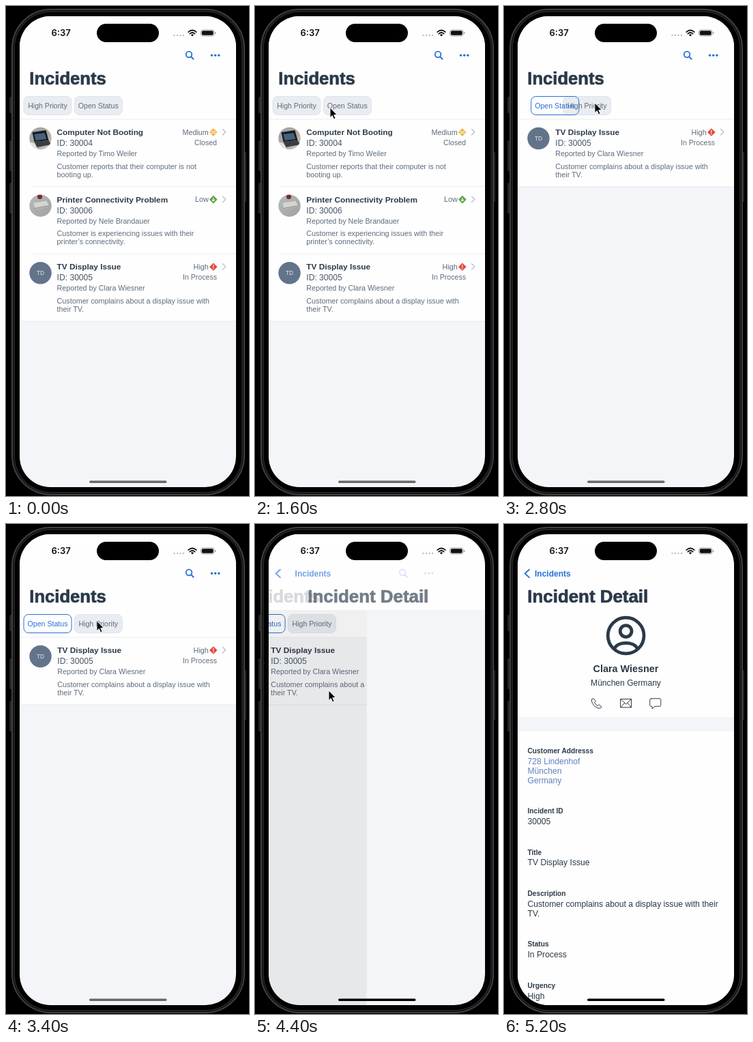
Animation of 356x718 px, one loop 5400 ms. Source, as an HTML page:

```html
<!DOCTYPE html>
<html lang="en">
<head>
<meta charset="utf-8">
<title>Incidents</title>
<style>
  html, body { margin: 0; height: 100%; overflow: hidden; background: #000; }
  svg { display: block; width: 100vw; height: 100vh; }
  text { font-family: "Liberation Sans", Arial, sans-serif; white-space: pre; }
</style>
</head>
<body>
<svg viewBox="0 0 356 718">
  <defs>
    <clipPath id="screen"><rect x="20" y="15" width="317" height="690" rx="45"/></clipPath>
    <clipPath id="disc"><circle r="16.2"/></clipPath>
    <linearGradient id="desk" x1="0" y1="0" x2="1" y2="1">
      <stop stop-color="#9aa3aa"/><stop offset=".6" stop-color="#b5a99e"/><stop offset="1" stop-color="#d9d5d0"/>
    </linearGradient>
    <linearGradient id="paper" x1="0" y1="0" x2="1" y2="1">
      <stop stop-color="#b9babb"/><stop offset="1" stop-color="#9fa0a0"/>
    </linearGradient>
  </defs>
  <g fill="#242426">
    <rect x="5" y="133" width="6" height="24" rx="1.5"/>
    <rect x="5" y="197" width="6" height="45" rx="1.5"/>
    <rect x="5" y="259" width="6" height="45" rx="1.5"/>
    <rect x="346" y="214" width="6" height="73" rx="1.5"/>
  </g>
  <rect x="9" y="5" width="340" height="711" rx="57" fill="#09090a" stroke="#414144" stroke-width="2"/>
  <rect x="12" y="8" width="334" height="705" rx="54" fill="#000" stroke="#232325" stroke-width="2"/>
  <g clip-path="url(#screen)">
    <g id="pages"></g>
    <g id="status"></g>
  </g>
</svg>
<script>
const LOOP = 5400, STEP = 200;
const INK = '#2b3a49', MUTED = '#5d6c7c', BLUE = '#2a70d8', PAGE = '#fefefe', GREY = '#f4f5f8';

const ROWS = {
  laptop: { title: 'Computer Not Booting', id: 30004, by: 'Timo Weiler', level: 'Medium', state: 'Closed',
    note: ['Customer reports that their computer is not', 'booting up.'] },
  printer: { title: 'Printer Connectivity Problem', id: 30006, by: 'Nele Brandauer', level: 'Low', state: '',
    note: ['Customer is experiencing issues with their', 'printer\u2019s connectivity.'] },
  tv: { title: 'TV Display Issue', id: 30005, by: 'Clara Wiesner', level: 'High', state: 'In Process',
    note: ['Customer complains about a display issue with', 'their TV.'] }
};

const AVATARS = {
  laptop: `<g clip-path="url(#disc)"><rect x="-17" y="-17" width="34" height="34" fill="url(#desk)"/>
    <path d="M-12-9 8-12 12 3-9 5Z" fill="#171c24"/><path d="M-9-6 6-8 9 1-7 3Z" fill="#46617b"/>
    <path d="M-9 5 12 3 16 9-5 13Z" fill="#3a3d42"/><path d="M-17 5-9 7-3 17-17 17Z" fill="#e4e2df"/></g>`,
  printer: `<g clip-path="url(#disc)"><rect x="-17" y="-17" width="34" height="34" fill="url(#paper)"/>
    <path d="M-10-4 9-7 13 1-8 5Z" fill="#d4d4d3"/><path d="M-9 4 13 0" stroke="#858585"/>
    <circle cx="-1" cy="-13" r="3.5" fill="#7a2a2a"/></g>`,
  tv: `<circle r="16.2" fill="#63748a"/><text y="3" font-size="8.4" text-anchor="middle" fill="#dfe5ec">TD</text>`
};

const MARKS = {
  Medium: ['#efb23f', 'M-3-1H3M-3 1.2H3'],
  Low: ['#55a03e', 'M0-2.6V2M-1.8.4 0 2.2 1.8.4'],
  High: ['#e2483d', 'M0-3V.6M0 2V3']
};

// Pointer positions: time, x, y
const POINTER = [[800, 36, 142], [1000, 39, 142], [1400, 62, 145], [1600, 110, 149], [2000, 118, 147],
  [2200, 127, 145], [2600, 133, 142], [3600, 134, 149], [3800, 134, 205], [4000, 132, 236],
  [4400, 108, 244], [4600, 35, 266]];

const mix = (a, b, p) => a + (b - a) * p;
const easeOut = (t, start, length, power) =>
  1 - (1 - Math.min(1, Math.max(0, (t - start) / length))) ** power;

const text = (x, y, size, str, fill = INK, extra = '') =>
  `<text x="${x}" y="${y}" font-size="${size}" fill="${fill}" ${extra}>${str}</text>`;
const bold = (x, y, size, str, fill = INK, extra = '') => text(x, y, size, str, fill, 'font-weight="700" ' + extra);
const rect = (x, y, w, h, fill, extra = '') =>
  `<rect x="${x}" y="${y}" width="${w}" height="${h}" fill="${fill}" ${extra}/>`;
const line = (d, color, width = 1) =>
  `<path d="${d}" fill="none" stroke="${color}" stroke-width="${width}" stroke-linecap="round" stroke-linejoin="round"/>`;
const group = (x, y, body, opacity = 1) =>
  `<g transform="translate(${x} ${y})" opacity="${opacity}">${body}</g>`;
const headline = (x, size, str) => bold(x, 114.6, size, str, INK, `stroke="${INK}" stroke-width=".7"`);

function row(kind, y, nudge) {
  const r = ROWS[kind], [color, mark] = MARKS[r.level], x = 74.6 + nudge;
  const right = 'text-anchor="end"';
  return group(0, y,
    group(50.5, 28, AVATARS[kind]) +
    bold(x, 23, 11.8, r.title) +
    text(x, 39.3, 12.1, 'ID: ' + r.id, '#48586a') +
    text(x, 54.3, 10.7, 'Reported by ' + r.by, MUTED) +
    r.note.map((s, i) => text(x, 72.5 + i * 12.2, 10.75, s, MUTED)).join('') +
    text(296.8, 22.8, 10.8, r.level, MUTED, right) +
    text(309, 38, 10.6, r.state, MUTED, right) +
    group(303.8, 19, `<path d="M0-5.8 5.8 0 0 5.8-5.8 0Z" fill="${color}"/>` + line(mark, '#fff', 1.1)) +
    line('M317.5 14.5 321.8 18.7 317.5 23', '#b4bac1', 1.2));
}

function chip(x, label, on) {
  return rect(x + .5, 132.5, 70, 27, on ? 'none' : '#e9ecf0',
      `rx="7" stroke="${on ? BLUE : '#dfe3e9'}"`) +
    text(x + 35.5, 149.8, 10.6, label, on ? BLUE : MUTED, 'text-anchor="middle"');
}

function listPage(t) {
  const filtered = t >= 2600, nudge = t >= 1600 ? .7 : 0;
  const swap = easeOut(t, 2580, 510, 3);
  const kinds = filtered ? ['tv'] : ['laptop', 'printer', 'tv'];
  const end = filtered ? 265 : 462;
  let out = rect(20, 15, 317, 690, GREY) + rect(20, 15, 317, end - 15, PAGE);
  if (t >= 4200) out += rect(20, 166, 317, 99, GREY);
  out += line('M20 166H337', '#e6e8eb', .8) + line(`M20 ${end}H337`, '#e0e3e7', .8);
  kinds.forEach((kind, i) => {
    const y = 166 + i * 98.6;
    if (i) out += line(`M36 ${y}H337`, '#e8eaed', .8);
    out += row(kind, y, nudge);
  });
  return out + chip(mix(25.5, 99.8, swap), 'High Priority', false) +
    chip(mix(99.8, 25.5, swap), 'Open Status', filtered);
}

const listHeader = () => headline(34.3, 25.6, 'Incidents') +
  `<circle cx="268" cy="71" r="4.3" fill="none" stroke="${BLUE}" stroke-width="1.8"/>` +
  line('M271.4 74.5 274.6 77.8', BLUE, 2) +
  [301.5, 306.7, 311.9].map(x => `<circle cx="${x}" cy="72.3" r="1.7" fill="${BLUE}"/>`).join('');

const detailHeader = slide => line('M37 66.8 30.7 72.5 37 78.4', BLUE, 1.9) +
  bold(45 + 30 * slide, 76.7, 12, 'Incidents', BLUE) +
  headline(34.3 + 95 * slide, 25.9, 'Incident Detail');

function detailBody() {
  const mid = 'text-anchor="middle"', link = '#5c82c0';
  const fields = [[336, 'Customer Addresss', '728 Lindenhof', 'München', 'Germany'],
    [424, 'Incident ID', '30005'], [484.5, 'Title', 'TV Display Issue'],
    [544.7, 'Description', 'Customer complains about a display issue with their', 'TV.'],
    [619.3, 'Status', 'In Process'], [680, 'Urgency', 'High']];
  return rect(20, 126, 317, 579, PAGE) + rect(20, 283, 317, 21, GREY) +
    group(178.6, 163.5, `<g fill="none" stroke="${INK}" stroke-width="4.8"><circle r="26.4"/>
      <circle cy="-6.5" r="8.4"/><path d="M-17 19.5C-12 8 12 8 17 19.5"/></g>`) +
    bold(178.5, 216.6, 14.4, ROWS.tv.by, INK, mid) +
    text(178.5, 237, 12.1, 'München Germany', INK, mid) +
    line('M128.5 257.2 131 255.5 134.2 259.6 132.6 261.6Q134 264.8 137.2 266.4L139.4 264.8 143 268 141 270Q138.5 271 134 267.8 127.5 262.8 128.5 257.2Z', INK) +
    line('M171 256.5H186.5V268.8H171ZM171 256.7 178.8 264 186.5 256.7M171 268.6 176.6 262.4M186.5 268.6 181 262.4', INK) +
    line('M215.5 255.8H228Q229.8 255.8 229.8 257.6V265.4Q229.8 267.2 228 267.2H221L217 270.8V267.2H215.5Q213.7 267.2 213.7 265.4V257.6Q213.7 255.8 215.5 255.8Z', INK) +
    fields.map(([y, label, ...lines], n) => bold(34.5, y, 10.2, label) +
      lines.map((s, i) => text(34.5, y + 15.8 + i * 14, 12.15, s, n ? INK : link)).join('')).join('');
}

function pointer(t) {
  const at = POINTER.filter(p => p[0] <= t).pop();
  if (!at || t >= 4800) return '';
  return group(at[1], at[2], '<path d="M0 0V14.5L3.3 11.5 5.6 16.8 8 15.8 5.7 10.6H10.2Z" fill="#000" stroke="#fff" stroke-width=".9"/>');
}

const statusBar = () => text(66.5, 44, 13, '6:37', '#111', 'style="font-family:Inter,sans-serif;font-weight:600"') +
  rect(133, 26, 91, 27, '#000', 'rx="13.5"') +
  [246.5, 251, 255.5, 260].map(x => `<circle cx="${x}" cy="43" r="1.2" fill="#bbb"/>`).join('') +
  `<path d="M273 44.6 270.8 42.3Q273 40.4 275.2 42.3Z" fill="#111"/>` +
  line('M269.3 40.6Q273 37.4 276.7 40.6M267.2 38.2Q273 32.8 278.8 38.2', '#111', 1.7) +
  rect(285.5, 35, 19.5, 9, 'none', 'rx="3" stroke="#999" stroke-width=".9"') +
  rect(286.8, 36.3, 16.9, 6.4, '#111', 'rx="1.8"') + rect(306, 38, 1.2, 3.2, '#999', 'rx=".6"');

function draw(t) {
  const push = easeOut(t, 4300, 400, 2.75), rest = 1 - push;
  let out = '';
  if (push < 1) {
    out += group(-95 * push, 0, listPage(t));
    if (push) out += rect(20, 15, 317, 690, '#000', `opacity="${.1 * push}"`) +
      rect(20, 15, 317, 111, PAGE) + rect(20 + 317 * rest, 126, 317, 579, GREY);
    out += group(-95 * push, 0, listHeader(), Math.max(0, 1 - 1.5 * push));
  } else {
    out += rect(20, 15, 317, 690, PAGE) + detailBody();
  }
  if (push) out += group(0, 0, detailHeader(rest), Math.min(1, 1.2 * push));
  out += rect(122, 695.5, 113.5, 3.6, push ? '#050505' : '#68696b', 'rx="1.8"');
  return out + pointer(t);
}

const pages = document.getElementById('pages');
document.getElementById('status').innerHTML = statusBar();
let shown = -1;
function tick() {
  const t = Math.floor(performance.now() % LOOP / STEP) * STEP;
  if (t !== shown) pages.innerHTML = draw(shown = t);
  requestAnimationFrame(tick);
}
tick();
</script>
</body>
</html>
```
